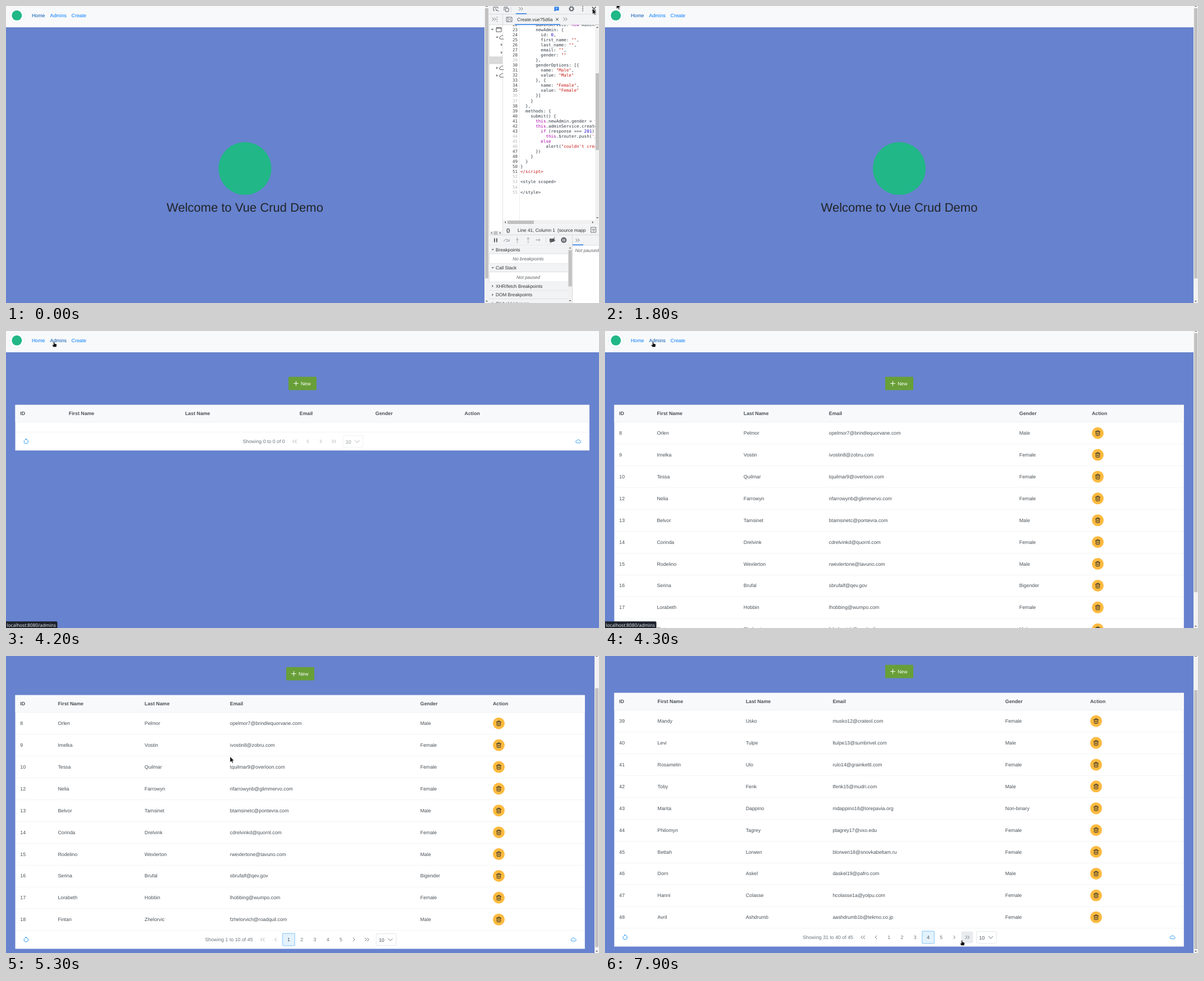
These frames come from a looping animation (1056 by 530 pixels, 8 s). An HTML page:

```html
<!DOCTYPE html>
<html lang="en">
<head>
<meta charset="utf-8">
<title>Vue Crud Demo</title>
<style>
html, body { margin: 0; width: 100%; height: 100%; overflow: hidden; }
svg { display: block; width: 1056px; height: 530px; font: 8.8px "Liberation Sans", Arial, sans-serif; text-rendering: geometricPrecision; }
text { white-space: pre; }
.line { fill: none; stroke-linecap: round; stroke-linejoin: round; }
.ui { font-size: 8.25px; fill: #333; }
.note { font-size: 8.25px; font-style: italic; fill: #5f6368; text-anchor: middle; }
.code { font: 7.56px "DejaVu Sans Mono", monospace; fill: #303942; }
.status { font: 8.25px "Noto Sans", sans-serif; fill: #e8eaed; }
.b { font-weight: bold; }
.m { text-anchor: middle; }
.e { text-anchor: end; }
.t { animation: 8s step-end infinite; }
.hide { visibility: hidden; }

#dev { animation-name: dev; }
#wide { animation-name: wide; }
#empty { animation-name: empty; }
#list { animation-name: list; }
#p1 { animation-name: p1; }
#p2 { animation-name: p2; }
#p3 { animation-name: p3; }
#p4 { animation-name: p4; }
#st1 { animation-name: st1; }
#st2 { animation-name: st2; }
#hand { animation-name: hand; }
#arrow { animation-name: arrow; }
#scroll { animation-name: scroll; }
#thumb { animation-name: thumb; }
#hover { animation-name: hover; }
#cursor { animation-name: cursor; }
#home { animation-name: home; }
#admins { animation-name: admins; }

@keyframes dev { 0% { visibility: visible } 2.5%, to { visibility: hidden } }
@keyframes wide { 2.5% { visibility: visible } 51.25%, to { visibility: hidden } }
@keyframes empty { 51.25% { visibility: visible } 53.75%, to { visibility: hidden } }
@keyframes list { 53.75%, to { visibility: visible } }
@keyframes p1 { 53.75% { visibility: visible } 78.75%, to { visibility: hidden } }
@keyframes p2 { 78.75% { visibility: visible } 83.75%, to { visibility: hidden } }
@keyframes p3 { 83.75% { visibility: visible } 87.5%, to { visibility: hidden } }
@keyframes p4 { 87.5%, to { visibility: visible } }
@keyframes st1 { 37.5% { visibility: visible } 48.75%, to { visibility: hidden } }
@keyframes st2 { 48.75% { visibility: visible } 58.75%, to { visibility: hidden } }
@keyframes hand { 37.5% { visibility: visible } 58.75% { visibility: hidden } 76.25%, to { visibility: visible } }
@keyframes arrow { 0% { visibility: visible } 37.5% { visibility: hidden } 58.75% { visibility: visible } 76.25%, to { visibility: hidden } }
@keyframes home { 0% { fill: #0056b3 } 50%, to { fill: #007bff } }
@keyframes admins { 0% { fill: #007bff } 48.75%, to { fill: #0056b3 } }
@keyframes scroll {
  0% { transform: none }
  62.5% { transform: translateY(-12.7px) }
  63.75% { transform: translateY(-34px) }
  65% { transform: translateY(-52px) }
  66.25% { transform: translateY(-62px) }
  67.5%, to { transform: translateY(-66px) }
}
@keyframes thumb {
  0% { transform: none }
  62.5% { transform: translateY(11px) }
  63.75% { transform: translateY(29.3px) }
  65% { transform: translateY(44.9px) }
  66.25% { transform: translateY(53.5px) }
  67.5%, to { transform: translateY(57px) }
}
@keyframes hover {
  76.25% { visibility: visible; transform: translateX(526.4px) }
  81.25% { visibility: visible; transform: translateX(552px) }
  85% { visibility: visible; transform: translateX(575.3px) }
  90% { visibility: visible; transform: translateX(552px) }
  92.5% { visibility: visible; transform: translateX(528.8px) }
  93.75% { visibility: visible; transform: translateX(552px) }
  95% { visibility: visible; transform: translateX(575.3px) }
  96.25% { visibility: visible; transform: translateX(598.5px) }
  97.5% { visibility: visible; transform: translateX(621.8px) }
  98.75%, to { visibility: visible; transform: translateX(645px) }
}
@keyframes cursor {
  0% { transform: translate(1044.5px, 4.5px) }
  5% { transform: translate(1044.5px, 4.5px); animation-timing-function: steps(3, start) }
  8.75% { transform: translate(400px, 63px); animation-timing-function: steps(2, start) }
  11.25% { transform: translate(17px, -16px) }
  22.5% { transform: translate(20.5px, -5px); animation-timing-function: steps(4) }
  27.5% { transform: translate(36px, 21px) }
  30% { transform: translate(36px, 21px); animation-timing-function: steps(2, start) }
  32.5% { transform: translate(47px, 20px) }
  37.5% { transform: translate(56px, 18px) }
  46.25% { transform: translate(56px, 18px); animation-timing-function: steps(4, start) }
  51.25% { transform: translate(85.5px, 19px) }
  58.75% { transform: translate(85.5px, 19px); animation-timing-function: steps(4, start) }
  63.75% { transform: translate(399px, 179.5px) }
  68.75% { transform: translate(399px, 179.5px); animation-timing-function: steps(7, start) }
  77.5% { transform: translate(528px, 503px) }
  80% { transform: translate(528px, 503px); animation-timing-function: steps(2, start) }
  82.5% { transform: translate(550px, 502.5px) }
  83.75% { transform: translate(550px, 502.5px); animation-timing-function: steps(2, start) }
  86.25% { transform: translate(575px, 503px) }
  90% { transform: translate(575px, 503px); animation-timing-function: steps(3, start) }
  93.75% { transform: translate(530px, 506px); animation-timing-function: steps(5, start) }
  to { transform: translate(635.5px, 507px) }
}
</style>
</head>
<body>
<svg id="stage" viewBox="0 0 1056 530"></svg>
<script>
const rect = (x, y, w, h, fill, attrs = '') => `<rect x="${x}" y="${y}" width="${w}" height="${h}" fill="${fill}" ${attrs}/>`;
const text = (x, y, s, fill = '', cls = '', attrs = '') => `<text x="${x}" y="${y}" class="${cls}" ${fill && `fill="${fill}"`} ${attrs}>${s}</text>`;
const line = (d, color, w = 1) => `<path class="line" d="${d}" stroke="${color}" stroke-width="${w}"/>`;
const disc = (x, y, r, fill, attrs = '') => `<circle cx="${x}" cy="${y}" r="${r}" fill="${fill}" ${attrs}/>`;
const at = (x, y, s, attrs = '') => `<g transform="translate(${x} ${y})" ${attrs}>${s}</g>`;
const timed = (id, s, hidden = true) => `<g id="${id}" class="t${hidden ? ' hide' : ''}">${s}</g>`;
const tri = (x, y, angle, r = 2, fill = '#505050') =>
  `<path d="M${-r} ${-r / 2}H${r}L0 ${r / 2}Z" transform="translate(${x} ${y}) rotate(${angle})" fill="${fill}"/>`;

const INK = '#495057', GREY = '#6c757d', BLUE = '#2196f3', RULE = '#e9ecef', BAR = '#f1f3f4', EDGE = '#cacdd1', GREEN = '#21b787';

// scrollbars
const vbar = (x, y, h, top, len, id = '') => rect(x, y, 8, h, '#f1f1f1') + tri(x + 4, y + 4, 180) + tri(x + 4, y + h - 4, 0) +
  rect(x + 1.1, top, 6, len, '#c1c1c1', id);
const hbar = (x, y, w, left, len) => rect(x, y, w, 8, '#f1f1f1') + tri(x + 4, y + 4, 90) + tri(x + w - 4, y + 4, -90) +
  rect(left, y + 1, len, 6, '#c1c1c1');

// site
const nav = rect(0, 0, 1056, 38, '#f8f9fa') +
  disc(19.3, 16.8, 13.4, '#fff', 'stroke="#dee2e6" stroke-width=".6"') + disc(19.3, 16.8, 9, GREEN) +
  text(46, 19.9, 'Home', '', 't', 'id="home"') + text(78.6, 19.9, 'Admins', '', 't', 'id="admins"') + text(116.6, 19.9, 'Create', '#007bff');

const welcome = x => disc(x, 290, 47, GREEN) + text(x, 366.7, 'Welcome to Vue Crud Demo', '#212529', 'm', 'font-size="22"');

const newButton = x => rect(x - 25, 81.8, 50, 23.6, '#689f38', 'rx="1.6"') +
  line(`M${x - 15.5} 93.6h8M${x - 11.5} 89.6v8`, '#fff') + text(x - 3, 96.7, 'New', '#fff');

const TITLES = ['ID', 'First Name', 'Last Name', 'Email', 'Gender', 'Action'];
const head = cols => TITLES.map((s, i) => text(cols[i], 149.7, s, INK, 'b')).join('');
const panel = (w, bottom) => rect(16.5, 131.8, w, bottom + 32.6 - 131.8, '#fff') + rect(16.5, 131.8, w, 31, '#f8f9fa') +
  rect(16.5, 162.6, w, .6, RULE) + rect(16.5, bottom - .3, w, .6, RULE);

const bin = at(0, 0, line('M-4.2-2.6H4.2M-1.6-2.8V-4.3H1.6V-2.8M-3.2-2.4V3.4Q-3.2 4.3-2.3 4.3H2.3Q3.2 4.3 3.2 3.4V-2.4M-1.1-.4V2.3M1.1-.4V2.3', '#212529', .9));

const angle = (x, y, dir) => `M${x - dir * 1.3} ${y - 2.8}l${dir * 2.7} 2.8l${-dir * 2.7} 2.8`;
const refresh = y => line(`M32.7 ${y - 1.8}A3.7 3.7 0 1 0 36.5 ${y - 3.3}l-2.2-.2m2.2.2l-1.5-1.7`, BLUE);
const cloud = (x, y) => line(`M${x - 2.5} ${y + 2.7}a2.2 2.2 0 0 1 -.4-4.4a2.9 2.9 0 0 1 5.3.7a1.9 1.9 0 0 1 .4 3.7z`, BLUE, .9);

function paginator(label, current, cx, y) {
  const pages = current ? 5 : 0, n = pages + 4, pitch = 23.25;
  const w = 75.3 + 4.9 * (label.match(/\d/g).length - 3);
  const left = cx - (56.2 + w + n * pitch) / 2;
  const btn = i => left + 11.4 + w + pitch * (i + .5);
  const arrow = (i, dir, twice, off) => `<g opacity="${off ? .6 : 1}">` +
    line(twice ? angle(btn(i) - 2, y, dir) + angle(btn(i) + 2, y, dir) : angle(btn(i), y, dir), GREY) + '</g>';
  let s = text(left + 5.7, y + 3, label, GREY);
  s += arrow(0, -1, true, current < 2) + arrow(1, -1, false, current < 2);
  for (let p = 1; p <= pages; p++) {
    const x = btn(p + 1);
    if (p === current) s += rect(x - 10.9, y - 10.9, 21.8, 21.8, '#e3f2fd', 'rx="2" stroke="#a6d5fa" stroke-width="1.5"');
    s += text(x, y + 3.1, p, p === current ? INK : GREY, 'm');
  }
  s += arrow(n - 2, 1, false, !pages) + arrow(n - 1, 1, true, !pages);
  const dx = btn(n - 1) + pitch / 2 + 4.4;
  return s + `<g opacity="${pages ? 1 : .6}">` + rect(dx + .3, y - 10.3, 35.5, 20.9, '#fff', 'rx="1.6" stroke="#ced4da" stroke-width=".6"') +
    text(dx + 5, y + 3.7, '10', INK) + line(`M${dx + 21.8} ${y - 1.6}l3.8 3.6l3.8-3.6`, GREY) + '</g>';
}

const GENDER = { M: 'Male', F: 'Female', B: 'Bigender', N: 'Non-binary' };
const ROW = 38.89;
function page(number, cols, data) {
  const rows = data.trim().split('\n').map((row, i) => {
    const [id, first, last, host, g] = row.split(' ');
    const mail = (first[0] + last).toLowerCase() + (id - 1).toString(36) + '@' + host;
    const y = 182.2 + ROW * i;
    return [id, first, last, mail, GENDER[g]].map((s, k) => text(cols[k], y + 3, s, INK)).join('') +
      at(cols[5] + 10.5, y, disc(0, 0, 10.5, '#fdba3f') + bin);
  }).join('');
  const from = number * 10 - 9;
  return timed('p' + number, head(cols) + rows + paginator(`Showing ${from} to ${from + 9} of 45`, number, 524, 568));
}

const pages = page(1, [25.3, 92.4, 246.8, 398.8, 737.8, 867], `
8 Orlen Pelmor brindlequorvane.com M
9 Imelka Vostin zobru.com F
10 Tessa Quilmar overloon.com F
12 Nelia Farrowyn glimmervo.com F
13 Belvor Tamsinet pontevra.com M
14 Corinda Drelvink quornl.com F
15 Rodelino Wexlerton tavuno.com M
16 Serina Brufal qev.gov B
17 Lorabeth Hobbin wumpo.com F
18 Fintan Zhelorvic roadquil.com M`) +
page(2, [25.3, 92.4, 246.8, 412, 748.7, 867], `
19 Ferelina Mossup vextorlati.com F
20 Broden Pask cloudermount.com M
21 Reggie Dolliam fernap.it M
22 Delinda Prautly vodl.ru F
23 Horvin Lambidge plavo.com M
24 Melvia Copperlane oldquart.co.uk F
25 Joss Nortfield kwz.edu M
26 Kael Brickham nilmo.com M
27 Wilma Parchment tolkrun.com F
28 Corbin Tallowen jqv.com M`) +
page(3, [25.3, 95, 252, 415, 757, 879], `
29 Maribel Osgrove plimtor.com F
30 Anselm Tarvick weddro.com M
31 Junia Pellow oakvint.org F
32 Radley Cruspin brolm.com M
33 Odetta Winsorn kelpadra.com F
34 Tobin Hasque vurdo.co.uk M
35 Celeste Marrop fintlow.com F
36 Edric Lunborn sarvok.edu M
37 Petra Dimwold jostrel.com F
38 Alden Foskett mirplan.com M`) +
page(4, [25.3, 93.6, 250.7, 405.4, 712.8, 864], `
39 Mandy Usko crateol.com F
40 Levi Tulpe sumbrivel.com M
41 Rosamelin Ulo grainkettl.com F
42 Toby Fenk mudri.com M
43 Marita Dappino lorepavia.org N
44 Philomyn Tagrey vxo.edu F
45 Bettah Lorwen snovkabeltam.ru F
46 Dorn Askel pafro.com M
47 Hanni Colasse yolpu.com F
48 Avril Ashdrumb tekmo.co.jp F`);

const bottom = 163 + ROW * 10;
let rules = '';
for (let i = 1; i < 10; i++) rules += rect(16.5, 162.7 + ROW * i, 1014.3, .6, RULE);
const list = timed('list', newButton(524) + panel(1014.3, bottom) + rules + refresh(568) + cloud(1011, 568));
const empty = timed('empty', newButton(528) + panel(1022.5, 180.6) + head([25.3, 111.8, 319, 522.8, 657.8, 816.6]) +
  refresh(197) + cloud(1019.5, 197) + paginator('Showing 0 to 0 of 0', 0, 528, 197));
const hover = timed('hover', rect(-10.4, 557.6, 20.8, 20.8, RULE, 'rx="1.6"'));

// developer tools
const SRC = `      adminService: new AdminService(),
      newAdmin: {
        id: 0,
        first_name: "",
        last_name: "",
        email: "",
        gender: ""
      },
      genderOptions: [{
        name: "Male",
        value: "Male"
      }, {
        name: "Female",
        value: "Female"
      }]
    }
  },
  methods: {
    submit() {
      this.newAdmin.gender = this.gender
      this.adminService.create(this.newAdmin)
        if (response === 201)
          this.$router.push('/admins')
        else
          alert("couldn't create admin")
      })
    }
  }
}
&lt;/script>

&lt;style scoped>

&lt;/style>`.split('\n');
const DIM = [29, 36, 37, 44, 45, 46, 52, 53, 54, 55];
const paint = s => s.replace(/("[^"]*"|'.*|&lt;\/script>)|\b(this|if|else|new)\b|\b\d+\b/g, (m, str, key) =>
  `<tspan fill="${str ? '#c41a16' : key ? '#a0a' : '#1c00cf'}">${m}</tspan>`);
const code = SRC.map((s, i) => {
  const y = 35.6 + 9.06 * i, n = 22 + i;
  return text(911, y, n, DIM.includes(n) ? '#bbb' : '#444', 'code e', `style="fill:${DIM.includes(n) ? '#b8b8b8' : '#444'}"`) + text(916, y, paint(s), '', 'code');
}).join('');

const ICON = '#5f6368';
const more = (x, y) => line(`M${x - 3.2} ${y - 2.6}l2.6 2.6l-2.6 2.6M${x + .6} ${y - 2.6}l2.6 2.6l-2.6 2.6`, ICON, .9);
const section = (y, s, open) => rect(860, y - 7.7, 141, 15, BAR) + rect(860, y + 7, 141, .6, EDGE) +
  tri(866.8, y, open ? 0 : -90, 2.3, ICON) + text(872, y + 3, s, '', 'ui');
const cloudlet = y => line(`M886 ${y + 3}H881a2.2 2.2 0 0 1 0-4.4a3 3 0 0 1 4-2`, '#444', .9);

const topBar = rect(860, 0, 196, 33.5, BAR) + rect(860, 14, 196, .6, EDGE) + rect(860, 33.2, 196, .6, EDGE) +
  line('M870 8H868V2H876V4M872 4l1.6 5l1.2-2l2.4 2.4', ICON) + line('M887 8V2H893M890 4H895V10H890Z', ICON) + more(917, 5) +
  rect(908, 13, 19, 1.4, '#1a73e8') + rect(899.5, 1, .6, 10, EDGE) +
  '<path d="M976.5 1.5H984.500V8H979L976.500 10Z" fill="#1a73e8"/>' + line('M978.5 3.7h4M978.5 5.7h3', '#fff', .7) +
  disc(1007, 5, 3, 'none', `stroke="${ICON}" stroke-width="1.5"`) + disc(1007, 5, 4.2, 'none', `stroke="${ICON}" stroke-width="1.4" stroke-dasharray="1.65"`) +
  [1.6, 5, 8.4].map(y => disc(1027, y, 1, ICON)).join('') + line('M1044 2l6 6m0-6l-6 6', '#333', 1.2) +
  more(869, 23.5) + [20, 23.5, 27].map(y => disc(874.5, y, .7, ICON)).join('') + rect(884, 14, .6, 395, EDGE) +
  line('M891.5 20H901V28H891.500ZM894 20V28M899 22l-2.300 2l2.300 2', ICON, .9) +
  text(910.3, 26.8, 'Create.vue?5d6a', '', 'ui') + line('M979.5 21.8l4 4m0-4l-4 4', '#333') + rect(906, 32.4, 81, 1.4, '#1a73e8') + more(996, 23.5);

const tree = rect(860, 90, 24, 13.6, '#dadada') + tri(866, 42, 0, 2.4, ICON) + line('M873.5 38.500H882V46H873.500ZM873.500 40H882', '#444', .9) +
  tri(874.5, 56, 0, 2.4, ICON) + tri(882.5, 69, -90, 2.4, ICON) + tri(882.5, 83, -90, 2.4, ICON) +
  tri(874.5, 110.5, -90, 2.4, ICON) + tri(874.5, 124, -90, 2.4, ICON) + [56, 110.5, 124].map(cloudlet).join('') + hbar(860.5, 401, 23.5, 868.5, 7);

const footer = rect(885, 390.5, 171, 18, BAR) + text(891, 402.6, '{}', '', 'ui', 'font-weight="bold"') +
  text(911, 402.9, 'Line 41, Column 1', '', 'ui') + text(982, 402.9, '(source mapped)', '', 'ui') + rect(1033, 391, 23, 17, BAR) +
  line('M1042 395H1050.500V404H1042ZM1044 398.500h4.500M1044.500 400l1.800 2l1.800-2', ICON, .9);

const debug = rect(860, 408.5, 196, 18.5, BAR) + rect(860, 408.3, 196, .7, EDGE) + rect(860, 426.8, 196, .6, EDGE) +
  rect(869, 414.5, 2, 7, ICON) + rect(873, 414.5, 2, 7, ICON) +
  line('M886.500 420a5 5 0 0 1 9.500-.5m.300-3v3.200h-3.200', '#9aa0a6') + disc(891.5, 420, 1, '#9aa0a6') +
  line('M910.500 413.500v5m-2-2l2 2l2-2M929.800 418.500v-5m-2 2l2-2l2 2M944 417.500h7m-2.300-2l2.300 2l-2.300 2', '#9aa0a6') +
  disc(910.5, 421.5, 1, '#9aa0a6') + disc(929.8, 421.5, 1, '#9aa0a6') + disc(945, 417.5, 1, '#9aa0a6') +
  '<path d="M968 415h7l3.500 3l-3.500 3h-7z" fill="#5f6368"/>' + line('M969.500 423l7.500-10', '#333') + rect(961, 412, .6, 11, EDGE) +
  disc(993.3, 417.8, 5, ICON) + rect(991.2, 415.500, 1.300, 4.600, '#fff') + rect(994.1, 415.500, 1.300, 4.600, '#fff') +
  more(1018, 418) + rect(1009, 425.6, 19, 1.4, '#1a73e8') +
  section(434.8, 'Breakpoints', true) + text(930, 454, 'No breakpoints', '', 'note') + rect(860, 459, 141, .6, EDGE) +
  section(467.4, 'Call Stack', true) + text(930, 486.8, 'Not paused', '', 'note') + rect(860, 491.8, 141, .6, EDGE) +
  section(500, 'XHR/fetch Breakpoints') + section(515.3, 'DOM Breakpoints') + section(530.6, 'Global Listeners') +
  vbar(1000.5, 427.4, 102.6, 435.5, 65) + rect(1008.3, 409, .7, 121, EDGE) + text(1034.5, 439, 'Not paused', '', 'note');

const dev = at(-98.5, 0, welcome(524)) + at(-196, 0, vbar(1048, -4, 535, 4, 482)) +
  rect(860, 0, 196, 530, '#fff') + rect(860, 0, .6, 530, EDGE) + code + rect(914, 34, .5, 348, '#ddd') +
  vbar(1049, 34, 348, 120, 137) + hbar(885, 382, 164, 893, 47) + rect(1049, 382, 7, 8.500, '#f1f1f1') + tree + topBar + footer + debug;

// overlays
const status = (id, w, s) => timed(id, `<path d="M0 518.300H${w - 2}q2 0 2 2V530H0Z" fill="#1d222c"/>` + text(1.3, 527.6, s, '', 'status'));
const cursor = '<g id="cursor" class="t">' +
  timed('arrow', '<path d="M0 0V10.200L2.400 8.100 4 11.600 5.600 10.900 4.100 7.500H7.200Z" fill="#0a0a0a" stroke="#fff" stroke-width=".5"/>') +
  timed('hand', '<path d="M-.9.8Q0-.4.9.8V3.500L4 4.300Q4.900 4.700 4.700 6L4.100 9.400H-1.200L-3 6.300Q-2.500 5-.9 6.200Z" fill="#0a0a0a" stroke="#fff" stroke-width=".3"/>') + '</g>';

document.getElementById('stage').innerHTML =
  rect(0, 0, 1056, 530, '#6782ce') +
  timed('scroll', nav + list + hover + empty + pages, false) +
  timed('wide', welcome(524) + vbar(1048, -4, 535, 4, 482)) +
  `<g style="animation-name:list" class="t hide">${vbar(1048, -4, 535, 4, 462, 'id="thumb" class="t"')}</g>` +
  timed('dev', dev) +
  status('st1', 61.5, 'localhost:8080') + status('st2', 91.5, 'localhost:8080/admins') + cursor;
</script>
</body>
</html>
```
